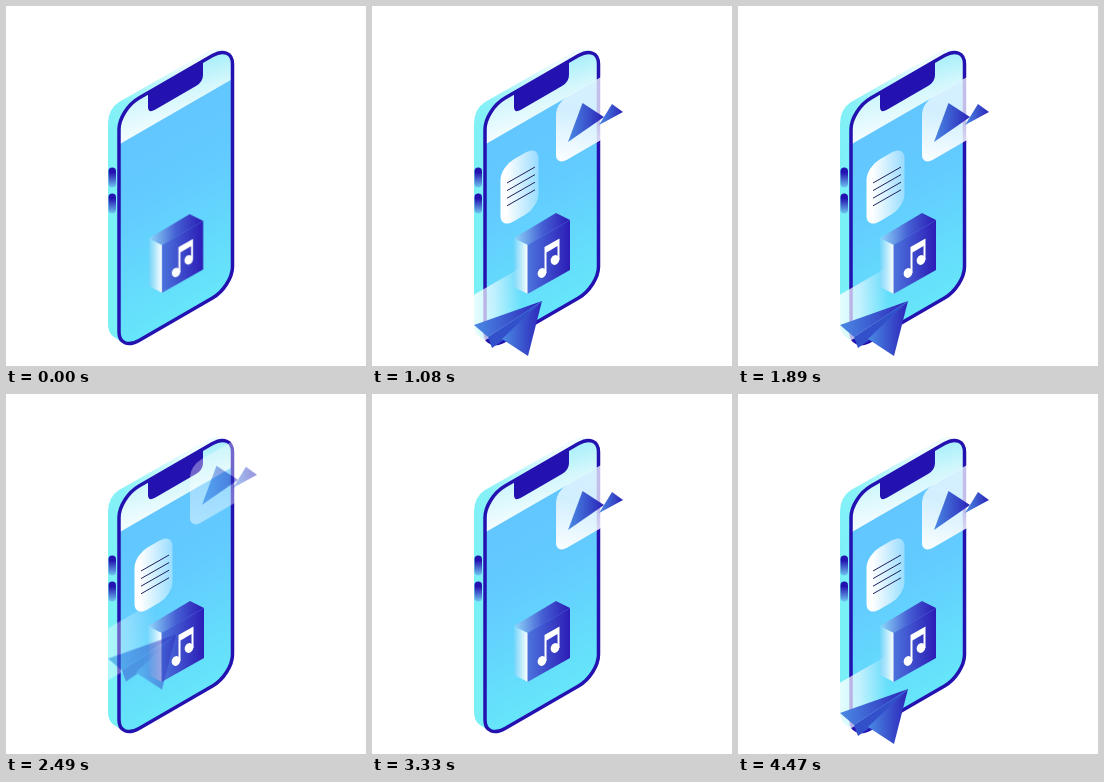
An HTML page for the animation above (4.5 s loop, 360 by 360 pixels).

```html
<!DOCTYPE html>
<html lang="en">
<head>
<meta charset="utf-8">
<title>Phone apps</title>
<style>
  html, body { margin: 0; width: 100%; height: 100%; overflow: hidden; background: #fff; }
  svg { display: block; width: 100vw; height: 100vh; }
  #lines { transform-origin: 120px 200px; }
  #music { transform-origin: 170px 248px; }
</style>
</head>
<body>
<svg viewBox="0 0 360 360">
  <defs>
    <linearGradient id="side" gradientUnits="userSpaceOnUse" x1="102" y1="200" x2="222" y2="150">
      <stop stop-color="#78f0f6"/><stop offset=".4" stop-color="#86f1f7"/><stop offset="1" stop-color="#effcfe"/>
    </linearGradient>
    <linearGradient id="screen" x2="0" y2="1">
      <stop stop-color="#62c3ff"/><stop offset=".45" stop-color="#62cbff"/><stop offset="1" stop-color="#66e6fa"/>
    </linearGradient>
    <linearGradient id="band" x1="0" y1="1" x2="1" y2="0">
      <stop stop-color="#f6fdff"/><stop offset=".5" stop-color="#d4f7fc"/><stop offset="1" stop-color="#9feefa"/>
    </linearGradient>
    <linearGradient id="button" x2="0" y2="1">
      <stop offset=".25" stop-color="#2412b0"/><stop offset="1" stop-color="#6fc8f2"/>
    </linearGradient>
    <linearGradient id="boxLeft">
      <stop stop-color="#70d4fa"/><stop offset="1" stop-color="#fff"/>
    </linearGradient>
    <linearGradient id="boxTop">
      <stop stop-color="#8fd8fa"/><stop offset=".5" stop-color="#4560d4"/><stop offset="1" stop-color="#2a1ab4"/>
    </linearGradient>
    <linearGradient id="boxFront">
      <stop stop-color="#4c74dd"/><stop offset="1" stop-color="#2c1cb6"/>
    </linearGradient>
    <linearGradient id="sheet">
      <stop offset=".15" stop-color="#fff"/><stop offset="1" stop-color="#fff" stop-opacity=".35"/>
    </linearGradient>
    <linearGradient id="photo" x1="0" y1="1" x2="1" y2="0">
      <stop stop-color="#fff"/><stop offset=".45" stop-color="#fff" stop-opacity=".72"/><stop offset="1" stop-color="#fff" stop-opacity=".75"/>
    </linearGradient>
    <linearGradient id="strip">
      <stop offset=".4" stop-color="#fff" stop-opacity=".85"/><stop offset=".65" stop-color="#fff" stop-opacity=".6"/><stop offset=".95" stop-color="#fff" stop-opacity="0"/>
    </linearGradient>
    <linearGradient id="wing">
      <stop stop-color="#4a8ae4"/><stop offset="1" stop-color="#2c23b8"/>
    </linearGradient>
    <clipPath id="face"><rect width="113.500" height="242.500" rx="20"/></clipPath>
  </defs>

  <path fill="url(#side)" d="M102 118Q102 103 113 96L201 46Q211 40 220 46L225 58 125 337Q118 338 108 331 102 327 102 318Z"/>
  <g fill="url(#button)">
    <rect x="102.500" y="161.500" width="7.500" height="20" rx="3.700"/>
    <rect x="102.500" y="187.500" width="7.500" height="20" rx="3.700"/>
  </g>
  <g transform="matrix(1 -.577 0 1 113 103.500)">
    <g clip-path="url(#face)">
      <rect width="113.500" height="242.500" fill="url(#screen)"/>
      <rect width="113.500" height="35" fill="url(#band)"/>
    </g>
    <path fill="#2412b0" d="M29 0H84V14q0 7-7 7H36q-7 0-7-7z"/>
    <rect width="113.500" height="242.500" rx="20" fill="none" stroke="#2412b0" stroke-width="3.500" vector-effect="non-scaling-stroke"/>
  </g>

  <g id="music">
    <path fill="url(#boxLeft)" d="M142 232 156 239V288L142 281Z"/>
    <path fill="url(#boxTop)" d="M142 232 184 207 198 214 156 239Z"/>
    <path fill="url(#boxFront)" d="M155.500 239 198 214V264L155.500 288Z"/>
    <g fill="#fff">
      <ellipse cx="170" cy="267" rx="4.200" ry="5" transform="rotate(25 170 267)"/>
      <ellipse cx="183" cy="254" rx="4.200" ry="5" transform="rotate(25 183 254)"/>
      <path d="M172.500 241 187.500 232.500V254H185.500V240L174.500 246.500V267H172.500Z"/>
    </g>
  </g>

  <g id="lines">
    <rect width="38" height="62" rx="13" fill="url(#sheet)" transform="matrix(1 -.577 0 1 128.500 161)"/>
    <path id="rows" fill="none" stroke="#20205c"/>
  </g>

  <g id="picture">
    <rect width="78" height="63" rx="11" fill="url(#photo)" transform="matrix(1 -.577 0 1 184 97)"/>
    <path fill="url(#wing)" d="M210.500 97 232 111 196 136Z"/>
    <path fill="url(#wing)" d="M240 98 251 106 227 119Z"/>
  </g>

  <g id="plane">
    <rect width="95" height="52" rx="5" fill="url(#strip)" transform="matrix(1 -.577 0 1 60 313)"/>
    <path fill="url(#wing)" d="M102 319 170 295 116 331Z"/>
    <path fill="#3350cb" d="M116 331 170 295 133 333 120 342Z"/>
    <path fill="url(#wing)" d="M170 295 156 350 130 333Z"/>
  </g>
</svg>
<script>
const LOOP = 4500;
const OUT = 'cubic-bezier(.2,.6,.4,1)', BOTH = 'ease-in-out';
const move = (x, y) => `translate(${x}px, ${y}px)`;
const scale = s => `scale(${s})`;

document.getElementById('rows').setAttribute('d',
  [0, 1, 2, 3].map(i => `M135 ${177 + i * 7.6}L163 ${161 + i * 7.6}`).join(''));

// Each step: time, transform, opacity, easing towards the next step
function play(id, steps) {
  const frames = steps.map(([time, transform, opacity, easing = 'linear']) =>
    ({ offset: time / LOOP, transform, opacity, easing }));
  document.getElementById(id).animate(frames, { duration: LOOP, iterations: Infinity });
}

// Slide in twice per loop, rise and fade once
function slide(id, from, rise, [in1, end1, in2, end2]) {
  const rest = move(0, 0), start = move(...from);
  play(id, [
    [0, start, 0], [in1, start, 0, OUT], [end1, rest, 1],
    [2280, rest, 1, BOTH], [2700, move(0, -rise), 0],
    [2701, start, 0], [in2, start, 0, OUT], [end2, rest, 1], [LOOP, rest, 1]
  ]);
}

slide('picture', [25, -14], 50, [100, 470, 2980, 3360]);
slide('plane', [-25, 14], 108, [460, 900, 3340, 3780]);
play('lines', [
  [0, scale(0), 1], [915, scale(0), 1, OUT], [1060, scale(1), 1],
  [2520, scale(1), 1, BOTH], [2680, scale(0), 1],
  [3800, scale(0), 1, OUT], [3945, scale(1), 1], [LOOP, scale(1), 1]
]);
play('music', [
  [0, scale(.97), 1, OUT], [60, scale(1), 1],
  [2520, scale(1), 1, BOTH], [2690, scale(0), 1, OUT],
  [2940, scale(1), 1], [LOOP, scale(1), 1]
]);
</script>
</body>
</html>
```
